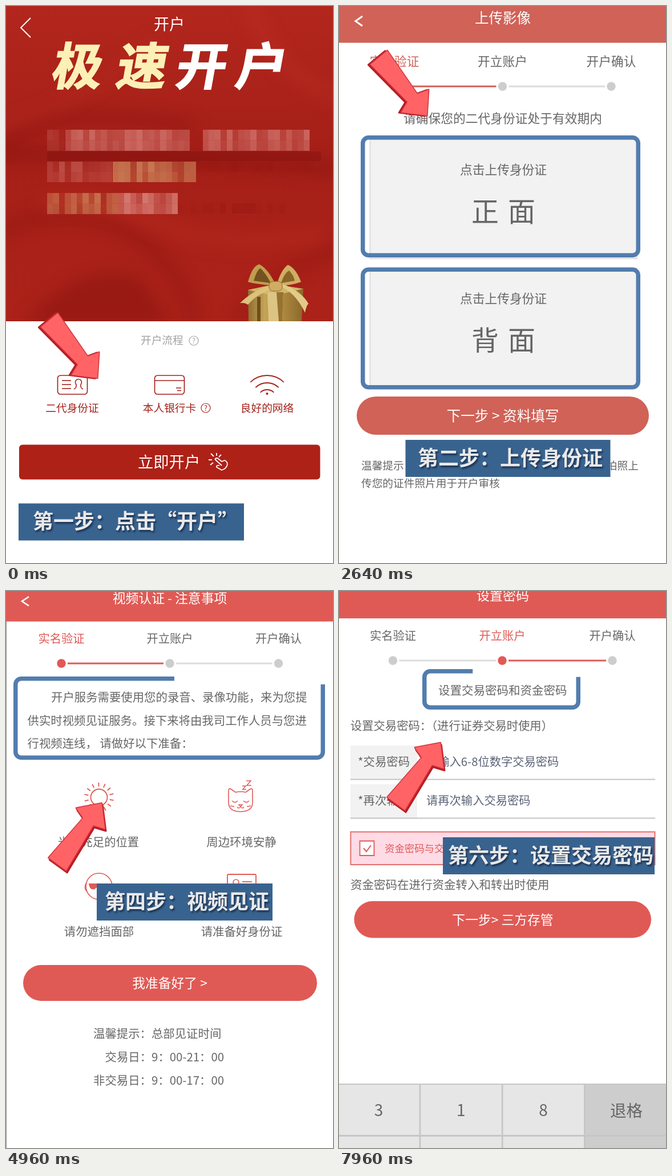
Animation, 573 px wide and 977 px high, one loop 8000 ms. Source, as an HTML page with a canvas:

```html
<!DOCTYPE html>
<html lang="zh-CN">
<head>
<meta charset="utf-8">
<title>开户流程</title>
<style>
html, body { margin: 0; width: 100%; height: 100%; overflow: hidden; background: #fff; }
canvas { display: block; width: 573px; height: 977px; }
</style>
</head>
<body>
<canvas id="stage" width="573" height="977"></canvas>
<script>
const W = 573, H = 977, LOOP = 8000, SCENE = 1520;
const FONT = '"Noto Sans CJK SC", "Noto Sans CJK", sans-serif';
const GREY = '#666', CORAL = '#d06257', RED = '#e05a55', DEEP = '#a5221b', BLUE = '#527dae';
const stage = document.getElementById('stage').getContext('2d');
let g = stage;

// ---------- helpers ----------
function txt(s, x, cy, size, color = GREY, align = 'left', weight = 400) {
  g.font = `${weight} ${size}px ${FONT}`;
  g.fontKerning = 'none'; // keeps CJK punctuation full width
  g.textAlign = align;
  g.fillStyle = color;
  g.fillText(s, x, cy + size * 0.38);
}
const mid = (s, x, cy, size, color, weight) => txt(s, x, cy, size, color, 'center', weight);

function rect(x0, y0, x1, y1, color) {
  g.fillStyle = color;
  g.fillRect(x0, y0, x1 - x0, y1 - y0);
}
function box(x0, y0, x1, y1, r, fill, stroke, lw = 2) {
  g.beginPath();
  g.roundRect(x0, y0, x1 - x0, y1 - y0, r);
  if (fill) { g.fillStyle = fill; g.fill(); }
  if (stroke) { g.strokeStyle = stroke; g.lineWidth = lw; g.stroke(); }
}
function trace(pts) {
  g.beginPath();
  for (let i = 0; i < pts.length; i += 2) g.lineTo(pts[i], pts[i + 1]);
}
function line(color, lw, ...pts) {
  trace(pts);
  g.strokeStyle = color;
  g.lineWidth = lw;
  g.stroke();
}
function poly(color, ...pts) {
  trace(pts);
  g.fillStyle = color;
  g.fill();
}
function arc(x, y, r, color, lw, a = 0, b = 2 * Math.PI) {
  g.beginPath();
  g.arc(x, y, r, a, b);
  g.strokeStyle = color;
  g.lineWidth = lw;
  g.stroke();
}
function dot(x, y, r, color) {
  g.beginPath();
  g.arc(x, y, r, 0, 7);
  g.fillStyle = color;
  g.fill();
}
function shape(d, fill, stroke, lw = 1.6) {
  const p = new Path2D(d);
  if (fill) { g.fillStyle = fill; g.fill(p); }
  if (stroke) { g.strokeStyle = stroke; g.lineWidth = lw; g.stroke(p); }
}
function help(x, y, color) {
  arc(x, y, 8, color, 1.2);
  mid('?', x, y, 12.5, color);
}
const noise = n => { const v = Math.sin(n * 12.9898) * 43758.5453; return v - Math.floor(v); };

function mosaic(x, y, cols, rows, ch, rgb, lo, hi, seed) {
  for (let r = 0; r < rows; r++) for (let c = 0; c < cols; c++) {
    const n = 0.7 * noise(seed + c * 3.7) + 0.3 * noise(seed + c * 3.7 + r * 1.3);
    rect(Math.round(x + c * 10.4), y + r * ch, Math.round(x + c * 10.4 + 10.4), y + (r + 1) * ch,
      `rgba(${rgb},${lo + (hi - lo) * n})`);
  }
}
function header(h, color, title, cy, size) {
  rect(0, 0, W, h, color);
  mid(title, 287, cy, size, '#fff');
}
function steps(xs, labelY, dotY, size, active, color) {
  ['实名验证', '开立账户', '开户确认'].forEach((s, i) => {
    const on = i === active;
    mid(s, xs[i], labelY, size, on ? color : GREY);
    if (i < 2) line(on ? color : '#dcdcdc', 3.2, xs[i] + 11, dotY, xs[i + 1] - 11, dotY);
    dot(xs[i], dotY, 7.7, on ? color : '#cdcdcd');
  });
}
function pill(x0, y0, x1, y1, color, label, size) {
  box(x0, y0, x1, y1, (y1 - y0) / 2, color);
  mid(label, 287, (y0 + y1) / 2, size, '#fff');
}

// ---------- pages ----------
function silk() {
  const bg = g.createLinearGradient(0, 0, 0, 553);
  bg.addColorStop(0, '#b2261d');
  bg.addColorStop(0.45, '#a62018');
  bg.addColorStop(1, '#ab2219');
  g.save();
  g.beginPath();
  g.rect(0, 0, W, 553);
  g.clip();
  rect(0, 0, W, 553, bg);
  g.filter = 'blur(14px)';
  const dark = 'rgba(125,14,12,.38)', lit = 'rgba(200,55,44,.3)';
  shape('M-20 250Q60 190 180 195T330 215', null, dark, 18);
  shape('M-20 260Q200 262 590 285', null, dark, 26);
  shape('M-20 400Q120 330 220 400T330 560', null, dark, 18);
  shape('M30 560Q130 440 240 480L290 560Z', dark);
  shape('M400 560Q450 470 600 420', null, dark, 14);
  shape('M60 350Q140 330 260 380T560 400', null, lit, 24);
  shape('M420 -20Q470 130 590 160', null, lit, 24);
  shape('M-20 215Q120 180 260 60', null, lit, 14);
  g.restore();
}
function gift() {
  const gold = g.createLinearGradient(424, 0, 522, 0);
  gold.addColorStop(0, '#8f6d2f');
  gold.addColorStop(0.3, '#c4a457');
  gold.addColorStop(0.6, '#b08b40');
  gold.addColorStop(1, '#8a672a');
  poly(gold, 424, 498, 470, 490, 521, 496, 518, 553, 425, 553);
  poly('#d2b56b', 424, 498, 470, 488, 521, 496, 470, 508);
  poly('#6f4f1d', 440, 510, 446, 510, 446, 553, 440, 553);
  poly('#dcc484', 458, 502, 486, 502, 484, 553, 460, 553);
  poly('#977230', 474, 502, 486, 502, 484, 553, 478, 553);
  shape('M466 490Q440 488 424 484Q432 455 444 453Q460 462 472 488Z', '#c19d4e');
  shape('M474 490Q482 462 494 454Q508 460 517 484Q494 492 474 490Z', '#cfae64');
  shape('M434 482Q440 462 446 460Q456 470 464 486Z', '#745220');
  shape('M482 486Q488 468 496 464Q504 472 506 482Z', '#8a6528');
  shape('M466 490Q436 496 410 521Q418 520 424 524Q440 504 470 496Z', '#dcc27c');
  shape('M476 490Q506 500 524 538Q526 526 530 522Q516 498 480 486Z', '#e2ca88');
  box(461, 483, 484, 500, 7, '#cfae62', '#8c6a2c', 1);
}
function pageStart() {
  silk();
  line('#fff', 2, 43, 21, 26, 38, 43, 55);
  mid('开户', 286, 32, 27, '#fff');
  [['极', 127], ['速', 240], ['开', 344], ['户', 449]].forEach(([c, x], i) => {
    const color = i < 2 ? '#fdf0b6' : '#fff';
    g.save();
    g.translate(x, 104.5);
    g.transform(1, 0, -0.18, 1, 0, 0);
    mid(c, 0, 0, 88, color, 900);
    g.strokeStyle = color;
    g.lineWidth = 2;
    g.strokeText(c, 0, 88 * 0.38);
    g.restore();
  });
  const pink = '222,140,132', tan = '222,175,118';
  rect(72, 255, 552, 272, 'rgba(120,12,10,.3)');
  mosaic(72, 217, 3, 2, 18.5, pink, 0.05, 0.25, 1);
  mosaic(104, 217, 21, 2, 18.5, pink, 0.35, 0.7, 2);
  mosaic(345, 217, 18, 2, 18.5, pink, 0.25, 0.65, 9);
  mosaic(72, 273, 11, 2, 18, pink, 0.1, 0.45, 5);
  mosaic(187, 273, 14, 2, 18, tan, 0.15, 0.75, 6);
  mosaic(333, 273, 20, 1, 18, '150,20,16', 0, 0.35, 8);
  mosaic(72, 328, 12, 2, 18.5, tan, 0, 0.6, 3);
  mosaic(197, 328, 10, 2, 18.5, pink, 0.35, 0.8, 4);
  mosaic(302, 346, 18, 1, 18, '140,18,14', 0, 0.3, 7);
  gift();

  txt('开户流程', 236, 586, 18.7, '#a2a2a2');
  help(329, 587, '#a2a2a2');
  box(90.5, 648, 142.5, 681, 5, null, DEEP, 1.7);
  for (const y of [657, 664, 671]) line(DEEP, 1.6, 98, y, 114, y);
  arc(127, 660, 5.5, DEEP, 1.6, 2.3, 7.1);
  shape('M123 664Q124 670 119 672M131 664Q130 670 135 672', null, DEEP);
  box(260.5, 648, 312.5, 681, 5, null, DEEP, 1.7);
  line(DEEP, 1.7, 261, 657, 312, 657);
  line(DEEP, 1.6, 298, 670, 307, 670);
  line(DEEP, 1.6, 300, 674.5, 307, 674.5);
  for (const r of [42, 29, 17]) arc(457.5, 690, r, DEEP, 1.8, -2.34, -0.8);
  dot(457.5, 680, 2, DEEP);
  mid('二代身份证', 116, 705, 18.7, DEEP);
  mid('本人银行卡', 286.5, 705, 18.7, DEEP);
  help(350, 705, DEEP);
  mid('良好的网络', 457.5, 705, 18.7, DEEP);

  box(23, 769.5, 550.5, 830.5, 6, '#ae2117');
  txt('立即开户', 231, 800, 27.3, '#fff');
  shape('M366 795L378 806M366 795Q369 791 373 795L378 799L383 797Q388 799 388 804Q386 812 378 814L369 809Q368 805 374 806', null, '#fff', 1.8);
  shape('M364 790L359 785M369 789V784M361 796H355M363 801L358 805M373 791L377 787', null, '#fff', 1.8);
}

function pageUpload() {
  header(64.5, CORAL, '上传影像', 21, 24.5);
  line('#fff', 3, 41, 18, 29, 26.5, 41, 35);
  steps([97, 286.5, 477], 97, 141, 21.7, 0, CORAL);
  mid('请确保您的二代身份证处于有效期内', 287, 197, 21.75);
  [[234, '正'], [460, '背']].forEach(([y, c]) => {
    box(54.5, y, 522, y + 209, 0, '#f2f2f2', '#dedede', 2);
    mid('点击上传身份证', 288, y + 53, 21.75);
    mid(c, 256, y + 126, 48);
    mid('面', 320, y + 126, 48);
  });
  pill(31, 685, 543, 752, CORAL, '下一步 > 资料填写', 24.6);
  txt('温馨提示：根据监管规定需实名制开户，请使用手机拍照上', 39, 806, 18.7);
  txt('传您的证件照片用于开户审核', 39, 837, 18.7);
}

function pageInfo() {
  header(64.5, CORAL, '个人信息', 21, 24.5);
  line('#fff', 3, 41, 18, 29, 26.5, 41, 35);
  steps([97, 286.5, 477], 97, 141, 21.7, 0, CORAL);
  txt('请填写以下个人信息', 189, 196, 21.7);
  ['姓名', '身份证号', '签发机关', '证件地址', '联系地址', '起始期限', '结束期限', '邮编', '城市名称', '职业', '工作单位'].forEach((s, i) => {
    const y = 287.5 + 70.2 * i + (i > 7 ? 8 : 0);
    rect(23, y - 62, 146, y, '#f3f3f3');
    line('#a9a9a9', 1.4, 23, y, 551, y);
    const cy = y - 31;
    if (s.length === 2) {
      txt('*', 40, cy, 21);
      txt(s[0], 49, cy, 21.6);
      txt(s[1], 107, cy, 21.6);
    } else if (i === 10) {
      txt(s, 41, cy, 21.6);
    } else {
      txt('*', 36, cy, 21);
      txt(s, 45, cy, 21.6);
    }
  });
  const ink = '90,90,90';
  mosaic(157, 520, 33, 1, 11, ink, 0.02, 0.16, 11);
  mosaic(157, 531, 33, 1, 20, ink, 0.05, 0.36, 12);
  rect(150, 551, 528, 563, '#f5f5f5');
  for (const y of [588, 662]) {
    mosaic(157, y, 5, 2, 18, ink, 0.03, 0.24, y);
    mosaic(219, y, 5, 2, 18, ink, 0.03, 0.24, y + 5);
    rect(150, y + 37, 314, y + 42, '#f5f5f5');
  }
  mosaic(157, 736, 7, 1, 19, ink, 0.12, 0.36, 15);
  mosaic(157, 810, 14, 1, 19, ink, 0.05, 0.4, 16);
  mosaic(157, 829, 14, 1, 18, ink, 0.02, 0.2, 17);
  rect(150, 847, 314, 852, '#f5f5f5');
  mosaic(157, 885, 19, 1, 18, ink, 0.08, 0.44, 18);
  mosaic(157, 903, 19, 1, 16, ink, 0, 0.1, 19);
  for (const y of [826, 896]) line('#8b8b8b', 2.6, 501, y - 6, 512, y + 5, 523, y - 6);
}

function pageVideo() {
  header(53.5, RED, '视频认证 - 注意事项', 12, 22.8);
  line('#fff', 2.6, 40, 10, 28, 18, 40, 26);
  line('#8a8a8a', 1, 0.5, 53, 0.5, H);
  steps([97, 287, 477.5], 83, 127, 20.3, 0, RED);
  txt('开户服务需要使用您的录音、录像功能，来为您提', 79, 186.5, 20.4);
  txt('供实时视频见证服务。接下来将由我司工作人员与您进', 37.5, 227, 20.4);
  txt('行视频连线， 请做好以下准备：', 37.5, 267.5, 20.4);

  arc(163, 362, 14.5, RED, 1.8);
  for (let i = 0; i < 14; i++) {
    const a = i * Math.PI / 7 + 0.2, c = Math.cos(a), s = Math.sin(a);
    line(RED, 1.8, 163 + 19 * c, 362 + 19 * s, 163 + 26 * c, 362 + 26 * s);
  }
  shape('M390 350Q390 345 395 348L402 353Q411 351 420 353L427 348Q432 345 432 350V372Q431 387 411 387Q391 387 390 372Z', null, RED);
  shape('M396 368Q401 373 406 368M416 368Q421 373 426 368M408 375H414L411 378ZM411 378Q408 383 405 379M411 378Q414 383 417 379M393 377L400 378M429 377L422 378', null, RED, 1.4);
  shape('M414 342H420L415 348H421M421 333H429L422 341H430', null, RED, 1.5);
  txt('光线充足的位置', 91, 440, 20.3);
  mid('周边环境安静', 412.5, 440, 20.4);
  arc(163, 518, 23, RED, 1.7);
  shape('M145 513H181Q180 525 171 523L163 517L155 523Q146 525 145 513Z', RED);
  shape('M140 513Q136 522 142 527M186 513Q190 522 184 527', null, RED);
  box(388, 497, 438, 532, 2, null, RED, 1.8);
  arc(403, 511, 5, RED, 1.6);
  line(RED, 1.8, 414, 510, 431, 510);
  line(RED, 1.8, 414, 518, 431, 518);
  mid('请勿遮挡面部', 163, 597.5, 20.4);
  mid('请准备好身份证', 413, 597.5, 20.4);

  pill(30, 656, 545, 719, RED, '我准备好了 >', 22.8);
  txt('温馨提示：总部见证时间', 153, 776, 20.4);
  txt('交易日：9：00-21：00', 173.5, 817, 20.4);
  txt('非交易日：9：00-17：00', 153, 858, 20.4);
}

function pageRisk() {
  header(48.5, RED, '风险测评', 7, 23);
  line('#333', 1.5, 572, 0, 572, H);
  steps([96, 285.5, 476], 79, 122, 20.3, 1, RED);
  txt('请完成风险测评', 215, 173, 20.3);
  txt('1. 您的主要收入来源是(单选)', 30, 229, 20.5);
  box(30, 264.5, 542.5, 563, 0, null, '#d2d2d2', 2);
  ['A. 工资、劳务报酬', 'B. 生产经营所得', 'C. 利息、股息、转让证券等金融性资产收入',
    'D. 出租、出售房地产等非金融性资产收入', 'E. 无固定收入'].forEach((s, i) => {
    const y = 294.5 + i * 59.7;
    if (i) line('#d2d2d2', 2, 30, y - 30, 542, y - 30);
    arc(58, y + 1, 12.5, '#e2726d', 1.8);
    txt(s, 89, y, 17.4, '#333');
  });
  txt('1/20', 121, 678, 20.5);
  txt('下一题', 398.5, 678, 20.3, RED);
}

function pagePassword() {
  header(48, RED, '设置密码', 7, 23);
  steps([94.5, 286, 479], 78, 122, 20.3, 1, RED);
  txt('设置交易密码和资金密码', 174, 174, 20.5);
  txt('设置交易密码：（进行证券交易时使用）', 20, 236.5, 20.3);
  [[271, '*交易密码', '请输入6-8位数字交易密码'], [339, '*再次输入', '请再次输入交易密码']].forEach(([y, a, b]) => {
    rect(20, y, 137, y + 59, '#f2f2f2');
    line('#c4c4c4', 2, 20, y + 59.5, 554, y + 59.5);
    txt(a, 33, y + 28.5, 20.4);
    txt(b, 153, y + 28.5, 20.3, '#5b6377');
  });
  box(20.5, 422.5, 553.5, 480, 0, '#ffdbe6', '#e2706c', 2);
  box(36.5, 438.5, 61.5, 464, 0, '#fff', RED, 1.8);
  line(RED, 2, 43, 451, 48, 457, 56, 446);
  txt('资金密码与交易密码相同', 80, 451, 17.4, RED);
  txt('资金密码在进行资金转入和转出时使用', 20, 515, 20.5);
  pill(26.5, 544, 547, 608.5, RED, '下一步> 三方存管', 22.8);
  rect(0, 864, W, H, '#c6c6c6');
  for (const y of [866, 957]) for (let i = 0; i < 4; i++)
    rect(i * 144.3 - 1, y, i * 144.3 + 140.5, y + 88, i < 3 ? '#e6e6e6' : '#cdcdcd');
  ['3', '1', '8'].forEach((s, i) => mid(s, 69.5 + i * 144.3, 910, 28));
  mid('退格', 503.5, 911, 28.5);
}

// ---------- moving parts ----------
function outline([x0, y0, x1, y1], p) {
  if (p <= 0) return;
  const lw = 7.5, r = 10;
  x0 += lw / 2; y0 += lw / 2; x1 -= lw / 2; y1 -= lw / 2;
  const len = 2 * (x1 - x0 + y1 - y0) - 8 * r + 2 * Math.PI * r;
  g.save();
  g.beginPath();
  g.moveTo(x1, y0 + r);
  g.arcTo(x1, y1, x0, y1, r);
  g.arcTo(x0, y1, x0, y0, r);
  g.arcTo(x0, y0, x1, y0, r);
  g.arcTo(x1, y0, x1, y1, r);
  g.closePath();
  if (p < 1) g.setLineDash([p * len, len * 2]);
  g.strokeStyle = BLUE;
  g.lineWidth = lw;
  g.stroke();
  g.restore();
}
function caption(x0, y0, x1, tx, s) {
  rect(x0, y0, x1, y0 + 65, '#39638f');
  g.save();
  g.shadowColor = 'rgba(10,25,50,.65)';
  g.shadowBlur = 3;
  g.shadowOffsetX = 2;
  g.shadowOffsetY = 3;
  txt(s, tx, y0 + 31, 36, '#e9e9e9', 'left', 700);
  g.restore();
}
function pointer(x, y, deg) {
  const pts = [0, 0, -33, 31, -40, 11, -132, 19, -132, -19, -40, -11, -33, -31];
  g.save();
  g.translate(x, y);
  g.rotate(deg * Math.PI / 180);
  g.lineJoin = 'round';
  for (const [dx, dy, color, edge] of [[-3, 2.5, '#b81e26', '#b81e26'], [-1, -1, '#ff6366', '#cf343b']]) {
    g.save();
    g.translate(dx, dy);
    trace(pts);
    g.closePath();
    g.strokeStyle = edge;
    g.lineWidth = 3;
    g.stroke();
    g.fillStyle = color;
    g.fill();
    g.restore();
  }
  g.restore();
}

// tip: x, y, angle, dx, dy
const scenes = [
  { page: pageStart, frames: [[14, 760, 560, 840]], cap: [22, 872.5, 417, 47, '第一步：点击“开户”'], tip: [160, 654, 50.4, 47, 57] },
  { page: pageUpload, frames: [[38, 227, 528, 441], [38, 458.5, 528, 672.5]], cap: [116.5, 761, 475.5, 138, '第二步：上传身份证'], tip: [108.5, 139, 50.4, 45.5, 54.5] },
  { page: pageInfo, frames: [[155, 165, 445, 223]], cap: [125, 420, 500.5, 136, '第三步：填写个人信息'], tip: [113, 309, -46, 41, -38] },
  { page: pageVideo, frames: [[13, 150, 559, 296]], cap: [159, 513, 467, 173, '第四步：视频见证'], tip: [169, 372, -54, -36, 49] },
  { page: pageRisk, frames: [[184.5, 137, 384.5, 208]], cap: [168, 563.5, 546.5, 181, '第五步：填写风险测评'], tip: [179, 266, -54, -37, 49] },
  { page: pagePassword, frames: [[146, 137, 423, 208]], cap: [182, 432, 553, 191, '第六步：设置交易密码'], tip: [179, 266, -54, 0, 0] }
];
for (const s of scenes) {
  s.still = document.createElement('canvas');
  s.still.width = W;
  s.still.height = H;
  g = s.still.getContext('2d');
  rect(0, 0, W, H, '#fff');
  s.page();
}
g = stage;

const ease = v => (1 - Math.cos(Math.PI * Math.min(1, Math.max(0, v)))) / 2;

function draw(ms) {
  const t = ms % LOOP, s = scenes[Math.floor(t / SCENE)], u = t % SCENE;
  g.drawImage(s.still, 0, 0);
  for (const f of s.frames) outline(f, ease(u / 567));
  caption(...s.cap);
  const k = ease((u - 767) / 340), [x, y, deg, dx, dy] = s.tip;
  pointer(x + dx * k, y + dy * k, deg);
}
let start;
function tick(now) {
  start ??= now;
  draw(Math.max(0, now - start));
  requestAnimationFrame(tick);
}
draw(0);
requestAnimationFrame(tick);
</script>
</body>
</html>
```
